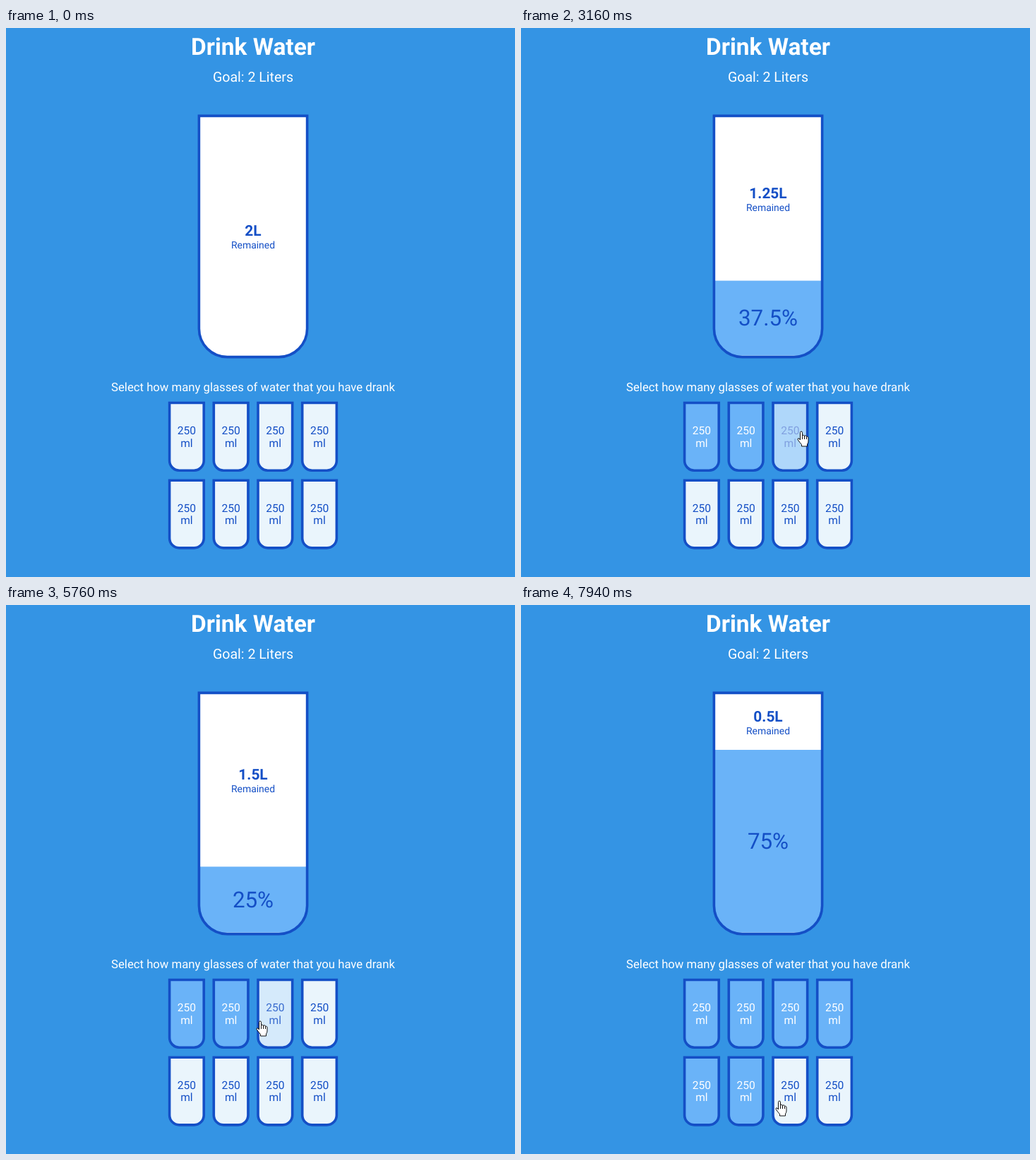
Write an HTML page that moves like this. It is 721 by 777 pixels and loops after 8000 ms.

```html
<!DOCTYPE html>
<html lang="en">
<head>
<meta charset="utf-8">
<title>Drink Water</title>
<style>
  html, body { margin: 0; width: 100%; height: 100%; overflow: hidden; background: #3494e4; }
  svg { display: block; width: 721px; height: 777px; }
  text { font-family: Roboto, sans-serif; text-anchor: middle; text-rendering: geometricPrecision; }
  .page { fill: #fff; }
  .ink { fill: #144fc6; }
  .rim { stroke: #144fc6; stroke-width: 3.6; }
  .pointer { fill: #fff; stroke: #111; stroke-linejoin: round; }
</style>
</head>
<body>
<svg viewBox="0 0 721 777">
  <g class="page">
    <text x="350" y="38.3" font-size="33.44" font-weight="700">Drink Water</text>
    <text x="350" y="75.8" font-size="19.56">Goal: 2 Liters</text>
    <text x="350" y="514.2" font-size="16.72">Select how many glasses of water that you have drank</text>
  </g>
  <clipPath id="inside"><path class="bigCup"/></clipPath>
  <path class="bigCup" fill="#fff"/>
  <g clip-path="url(#inside)">
    <rect id="water" x="272" width="157" fill="#6ab3f8"/>
    <text id="percent" class="ink" x="350" font-size="31.35"></text>
  </g>
  <path class="bigCup rim" fill="none"/>
  <g class="ink">
    <text id="liters" x="350" font-size="20.9" font-weight="700"></text>
    <text id="remained" x="350" font-size="13.93">Remained</text>
  </g>
  <g id="glasses"></g>
  <path id="arrow" class="pointer" d="M0 0V16.5L3.8 13 6.3 18.7 8.5 17.7 6 12.2H11.5Z"/>
  <path id="hand" class="pointer" d="M-1.5 12V1.5a1.5 1.5 0 0 1 3 0V6.5a1.5 1.5 0 0 1 3 .5a1.5 1.5 0 0 1 3 .7a1.5 1.5 0 0 1 2.5 1.3V14q0 2.5-1.5 4V21H.5V18.5q-2-2-5.5-7q0-2.5 2-1.5zM1.5 6.5V11M4.5 7V11M7.5 8V11"/>
</svg>
<script>
const LOOP = 8000, FADE = 300;
const REST_BEFORE = 120, REST_AFTER = 230;
const TOP = 126.4, BOTTOM = 463.6, GLASS_LEVEL = 43.1;
const GLASS_W = 52.25, GLASS_H = 99.3;
const EMPTY = [234, 245, 252], WATER = [106, 179, 248], INK = [20, 79, 198], WHITE = [255, 255, 255];

// Where the pointer rests, [time, x, y]; a rest inside a glass clicks it
const stops = [
  [50, 725, 690], [580, 573, 741], [1870, 258, 559], [2440, 313, 568], [3079, 397, 571], [3680, 441, 575],
  [4650, 388, 614], [5600, 360, 589], [6120, 318, 588], [6871, 266, 581], [7570, 318, 710], [8040, 366, 702]
];

const $ = id => document.getElementById(id);
const mix = (a, b, p) => a + (b - a) * p;
const blend = (a, b, p) => `rgb(${a.map((v, i) => Math.round(mix(v, b[i], p)))})`;
const clamp = v => Math.min(1, Math.max(0, v));

// CSS "ease": cubic-bezier(.25, .1, .25, 1)
function ease(x) {
  if (x <= 0 || x >= 1) return clamp(x);
  const bezier = (a, b, s) => 3 * a * s * (1 - s) ** 2 + 3 * b * s * s * (1 - s) + s ** 3;
  let low = 0, high = 1;
  for (let i = 0; i < 18; i++) {
    const s = (low + high) / 2;
    if (bezier(.25, .25, s) < x) low = s; else high = s;
  }
  return bezier(.1, 1, low);
}

// Outline along the middle of the rim
function cupPath(x, y, w, h, r) {
  const k = 1.8;
  r -= k;
  return `M${x + k} ${y + k}h${w - 2 * k}v${h - 2 * k - r}a${r} ${r} 0 0 1 ${-r} ${r}` +
    `h${2 * (r + k) - w}a${r} ${r} 0 0 1 ${-r} ${-r}z`;
}

const glassSpots = Array.from({ length: 8 }, (_, i) => [229.8 + i % 4 * 62.7, 528.7 + (i >> 2) * 109.7]);
const glassAt = (px, py) =>
  glassSpots.findIndex(([x, y]) => px > x && px < x + GLASS_W && py > y && py < y + GLASS_H);

// Clicking the last full glass empties it, any other click fills up to that glass
const levels = [{ time: -FADE, count: 0 }];
for (const [time, x, y] of stops) {
  const glass = glassAt(x, y), { count } = levels.at(-1);
  if (glass >= 0) levels.push({ time, count: glass + 1 === count ? glass : glass + 1 });
}

document.querySelectorAll('.bigCup').forEach(p => p.setAttribute('d', cupPath(271.6, 122.6, 156.8, 344.8, 41.8)));
$('glasses').innerHTML = glassSpots.map(([x, y]) => {
  const mid = x + GLASS_W / 2;
  return `<path class="rim" d="${cupPath(x, y, GLASS_W, GLASS_H, 15.7)}"/>
    <text font-size="15.6"><tspan x="${mid}" y="${y + 46.6}">250</tspan><tspan x="${mid}" y="${y + 64}">ml</tspan></text>`;
}).join('');
const glasses = [...$('glasses').querySelectorAll('path')];
const labels = [...$('glasses').querySelectorAll('text')];

function drawWater(t) {
  const n = levels.findLastIndex(level => level.time <= t);
  const { time, count } = levels[n], before = n ? levels[n - 1].count : 0;
  const p = ease((t - time) / FADE);
  const height = mix(before, count, p) * GLASS_LEVEL, surface = BOTTOM - height;

  $('water').setAttribute('y', surface);
  $('water').setAttribute('height', height);
  $('percent').textContent = 12.5 * (count || before) + '%';
  $('percent').setAttribute('y', surface + height / 2 + 10.7);
  $('percent').style.display = count || p < 1 ? '' : 'none';

  const middle = (TOP + surface) / 2;
  $('liters').textContent = 2 - count / 4 + 'L';
  $('liters').setAttribute('y', middle - 1);
  $('remained').setAttribute('y', middle + 17);

  glasses.forEach((glass, i) => {
    const full = mix(i < before, i < count, p);
    glass.style.fill = blend(EMPTY, WATER, full);
    labels[i].style.fill = blend(INK, WHITE, full);
  });
}

function drawPointer(t) {
  const i = Math.max(1, stops.findIndex(stop => stop[0] > t));
  const [t0, x0, y0] = stops[i - 1], [t1, x1, y1] = stops[i];
  const leave = t0 + REST_AFTER, arrive = t1 - REST_BEFORE;
  const s = clamp((t - leave) / (arrive - leave)), p = s * s * (3 - 2 * s);
  const x = mix(x0, x1, p), y = mix(y0, y1, p), overGlass = glassAt(x, y) >= 0;

  $('hand').style.display = overGlass ? '' : 'none';
  $('arrow').style.display = overGlass ? 'none' : '';
  $(overGlass ? 'hand' : 'arrow').setAttribute('transform', `translate(${x} ${y})`);
}

function frame() {
  const t = performance.now() % LOOP;
  drawWater(t);
  drawPointer(t);
  requestAnimationFrame(frame);
}
frame();
</script>
</body>
</html>
```
